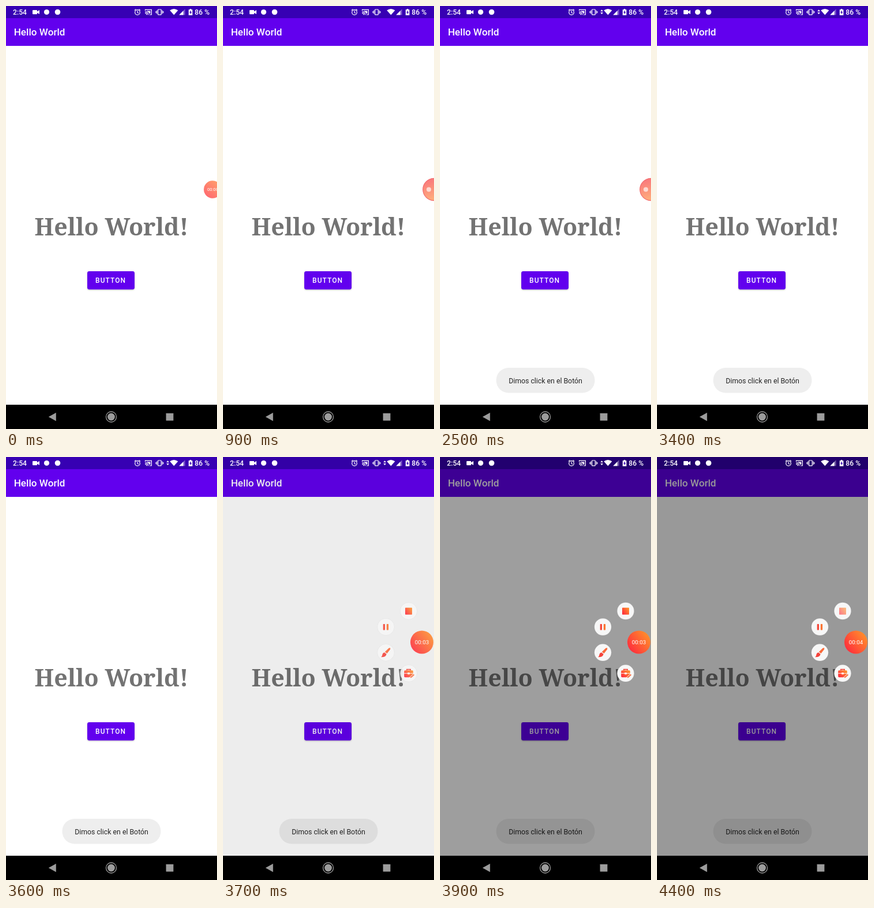
Animation of 366 by 732 pixels, one loop 4500 ms. Source, as an HTML page:

```html
<!DOCTYPE html>
<html lang="es">
<head>
<meta charset="utf-8">
<title>Hello World</title>
<style>
  html, body { margin: 0; width: 100%; height: 100%; overflow: hidden; background: #fff; }
  svg { display: block; width: 100vw; height: 100vh; font-family: Roboto, sans-serif; }
  .mid { text-anchor: middle; }
  .medium { font-weight: 500; }
</style>
</head>
<body>
<svg viewBox="0 0 366 732">
  <defs>
    <linearGradient id="hot" x1="0.1" y1="0.8" x2="0.9" y2="0.2">
      <stop offset="0" stop-color="#ff303c"/><stop offset="1" stop-color="#ff8b2c"/>
    </linearGradient>
    <linearGradient id="soft" x1="0.1" y1="0.9" x2="0.8" y2="0.1">
      <stop offset="0" stop-color="#ff6870"/><stop offset="1" stop-color="#ff9c6c"/>
    </linearGradient>
    <linearGradient id="tucked" x1="0.3" y1="0" x2="0.6" y2="1">
      <stop offset="0" stop-color="#f9777c"/><stop offset="1" stop-color="#ffb27c"/>
    </linearGradient>
  </defs>

  <!-- App screen -->
  <rect width="366" height="732" fill="#fff"/>
  <rect width="366" height="21" fill="#3700b3"/>
  <rect y="21" width="366" height="48" fill="#6200ee"/>
  <text class="medium" x="13.7" y="51.3" font-size="17.14" fill="#fff">Hello World</text>
  <text class="mid" x="183" y="397" font-size="41.14" font-weight="700" fill="#737373"
        style="font-family:'Noto Serif',serif">Hello World!</text>
  <rect id="button" x="141" y="459" width="82" height="31.4" rx="3.4" fill="#6200ee"/>
  <rect id="ripple" x="141" y="459" width="82" height="31.4" rx="3.4" fill="#fff"/>
  <text class="medium" x="155" y="479.2" font-size="12" letter-spacing="1.07" fill="#fff">BUTTON</text>
  <g id="toast">
    <rect x="97.5" y="626" width="171" height="43.5" rx="21.5" fill="#eee"/>
    <text class="mid" x="183" y="652.9" font-size="12.3" fill="#242424">Dimos click en el Botón</text>
  </g>

  <!-- Recorder bubble -->
  <g id="small">
    <circle cx="358.3" cy="317.5" r="15.2" fill="url(#soft)"/>
    <text class="mid" x="358.6" y="320.3" font-size="7.8" fill="#fff">00:00</text>
  </g>
  <g id="tuck">
    <circle cx="366" cy="317.5" r="19.2" fill="url(#tucked)" stroke="#f26a6c" stroke-width="1.2"/>
    <circle cx="357" cy="317.5" r="4" fill="#fff" opacity=".65"/>
  </g>
  <rect id="scrim" width="366" height="690"/>

  <!-- Recorder menu -->
  <g id="menu">
    <g id="disks" fill="#f7f7f7" stroke="#000" stroke-opacity=".05"></g>
    <rect id="stop" x="316" y="260.8" width="12" height="12" rx=".8" fill="url(#hot)"/>
    <rect x="277.7" y="289" width="3.3" height="10.5" rx=".8" fill="#f5483a"/>
    <rect x="283.8" y="289" width="3.3" height="10.5" rx=".8" fill="#fb7431"/>
    <path d="M289.5 330.3Q291 331 290 333L284.5 340 280.8 337.3 287.5 330.8Z" fill="#fb6a3a"/>
    <path d="M280 338.2L283.6 341Q283 346.5 274.3 346.2 276.6 344.3 276.5 341.5 277.2 338.6 280 338.2Z" fill="#f4433c"/>
    <path d="M318.8 369.5V367.6H325.2V369.5" fill="none" stroke="#f4483a" stroke-width="1.6"/>
    <rect x="314.2" y="369.2" width="15.6" height="12" rx="1.6" fill="url(#hot)"/>
    <path d="M314.2 374.4H329.8" stroke="#fff" stroke-width=".9"/>
    <rect x="320.3" y="373" width="3.4" height="3.2" fill="#fff"/>
    <path d="M324.5 382.5L332 375.8" stroke="#f7f7f7" stroke-width="3.6"/>
    <path d="M325.2 381.8L331.4 376.6" stroke="#fb6a3a" stroke-width="2"/>
    <circle cx="345" cy="320.5" r="20" fill="url(#hot)"/>
    <text id="timer" class="mid" x="345" y="324" font-size="9.8" fill="#fff"></text>
  </g>

  <!-- Status bar -->
  <g fill="#fff">
    <g class="medium" font-size="12.2">
      <text x="12" y="15.2">2:54</text>
      <text x="327.3" y="15.2">86 %</text>
    </g>
    <path d="M47 7H53.2Q54 7 54 7.8V9.5L58 7V14L54 11.8V13.4Q54 14.2 53.2 14.2H47Q46 14.2 46 13.2V8Q46 7 47 7Z"/>
    <circle cx="70.5" cy="10.5" r="4.6"/>
    <circle cx="89.5" cy="10.5" r="4.8"/>
    <g fill="none" stroke="#fff" stroke-width="1.2">
      <circle cx="228" cy="11" r="4.3"/>
      <path d="M228 8.3V11.2L230 12.4M222.9 7.6L225.4 5.5M233.1 7.6L230.6 5.5"/>
      <path d="M241.5 8V6.3H252.4V15H248.6M241.2 9.8Q246.3 10 246.6 15.4M241.2 12.2Q244 12.4 244.2 15.4"/>
      <rect x="263.6" y="6" width="5.6" height="9.2" rx=".6"/>
      <path d="M261.7 7.6V13.6M260 9V12.2M271.1 7.6V13.6M272.8 9V12.2"/>
    </g>
    <path d="M244.2 8.4H250.4V13H248.4Q247.4 10 244.2 9.2Z"/>
    <path id="up" d="M278.2 9.2L280.6 6.2 283 9.2Z"/>
    <path id="down" d="M278.2 11.2L280.6 14.2 283 11.2Z"/>
    <path d="M284.2 7.6Q291.2 2.6 298.4 7.6L291.3 15.6Z"/>
    <path d="M300.3 15.6L310.6 5.3V15.6Z" opacity=".35"/>
    <path d="M300.3 15.6L307.6 8.3V15.6Z"/>
    <path d="M318.8 5H321.4V6.2H323.4V16H316.8V6.2H318.8Z"/>
    <path d="M320.8 7.6L318 11.6H319.7V14.6L322.3 10.6H320.8Z" fill="#3700b3"/>
  </g>

  <!-- Navigation bar -->
  <rect y="690" width="366" height="42"/>
  <g fill="#9c9c9c">
    <path d="M73.8 711L86.8 703.8V718.2Z"/>
    <circle cx="182.5" cy="711" r="6.4"/>
    <circle cx="182.5" cy="711" r="9" fill="none" stroke="#9c9c9c" stroke-width="1.3"/>
    <rect x="277.6" y="704.7" width="12.8" height="12.8" rx=".6"/>
  </g>
</svg>
<script>
const LOOP = 4500, STEP = 100;
const $ = id => document.getElementById(id);
const fade = (id, a) => $(id).setAttribute('opacity', a);
const show = (id, on) => fade(id, on ? 1 : 0);

// Linear interpolation through [time, value] points.
function track(t, points) {
  if (t <= points[0][0]) return points[0][1];
  for (let i = 1; i < points.length; i++) {
    const [a, u] = points[i - 1], [b, v] = points[i];
    if (t <= b) return u + (v - u) * (t - a) / (b - a);
  }
  return points[points.length - 1][1];
}

$('disks').innerHTML = [[322, 266.5], [282.5, 294], [282.5, 338.3], [322, 374.3]]
  .map(([x, y]) => `<circle cx="${x}" cy="${y}" r="14.7"/>`).join('');

function draw(t) {
  const press = track(t, [[1400, 0], [1700, 1], [2000, 0]]);
  fade('ripple', 0.24 * press);
  $('button').style.filter =
    `drop-shadow(0 ${1 + 2.5 * press}px ${1 + 2 * press}px rgba(0,0,0,${0.25 + 0.1 * press}))`;
  fade('toast', track(t, [[1700, 0], [2100, 1]]));

  show('small', t < 100);
  show('tuck', t >= 100 && t < 3400);
  fade('scrim', track(t, [[3600, 0], [3700, 0.07], [3800, 0.3], [3900, 0.38], [4000, 0.4]]));
  fade('menu', track(t, [[3600, 0], [3700, 0.88], [3800, 1]]));
  fade('stop', t < 4400 ? 1 : 0.6);
  $('timer').textContent = t < 4100 ? '00:03' : '00:04';

  show('up', t >= 1500 && t < 4000);
  show('down', t >= 1800 && t < 4000);
}

const start = performance.now();
function tick() {
  const t = (performance.now() - start) % LOOP;
  draw(Math.floor(t / STEP) * STEP);
  requestAnimationFrame(tick);
}
tick();
</script>
</body>
</html>
```
